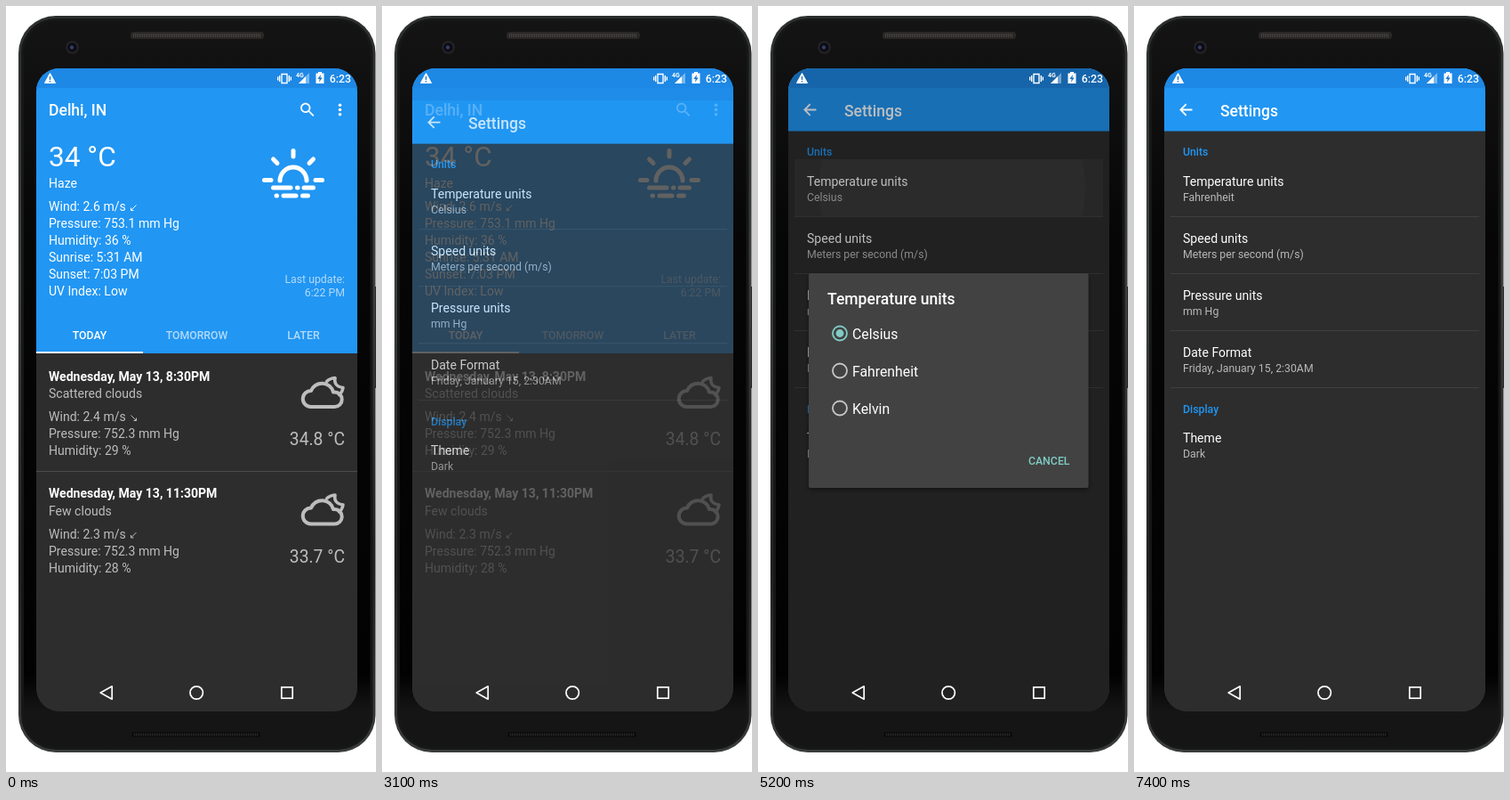
These frames come from a looping animation (416 by 860 pixels, 8000 ms). An HTML page:

```html
<!DOCTYPE html>
<html lang="en">
<head>
<meta charset="utf-8">
<title>Weather settings</title>
<style>
html, body { margin: 0; width: 100%; height: 100%; overflow: hidden; background: #fff; }
svg { display: block; width: 416px; height: 860px; font-family: Roboto, "Noto Sans", sans-serif; }
.m { font-weight: 500; }
.b { font-weight: 700; }
</style>
</head>
<body>
<svg id="stage" viewBox="0 0 416 860"></svg>
<script>
const W = '#fff', BLUE = '#2196f3', DARK = '#2d2d2d', TEAL = '#80cbc4', GREY = '#bdbdbd';
const SMALL = 12.3, BODY = 14.05, TITLE = 17.56;

const text = (s, x, y, size = BODY, fill = W, extra = '') =>
  `<text x="${x}" y="${y}" font-size="${size}" fill="${fill}" ${extra}>${s}</text>`;
const rect = (x, y, w, h, fill, extra = '') =>
  `<rect x="${x}" y="${y}" width="${w}" height="${h}" fill="${fill}" ${extra}/>`;
const line = (d, stroke, width, extra = '') =>
  `<path d="${d}" fill="none" stroke="${stroke}" stroke-width="${width}" ${extra}/>`;
const dot = (x, y, r, fill, extra = '') =>
  `<circle cx="${x}" cy="${y}" r="${r}" fill="${fill}" ${extra}/>`;
const MEDIUM = 'class="m"', END = 'text-anchor="end"', MID = 'text-anchor="middle" class="m"';
const ROUND = 'stroke-linecap="round" stroke-linejoin="round"';

// Small wind arrow pointing down, to the left (-1) or right (1)
const arrow = (y, dir, color) =>
  `<g transform="translate(143.5 ${y}) scale(${dir} 1)">` +
  line('M-3 -3L3 3M0 3H3V0', color, 1) + '</g>';

const phone = () =>
  rect(414, 315, 2, 114, '#222') +
  rect(14, 11, 401.5, 827, 'url(#rim)', 'rx="42"') +
  rect(17, 14, 395.5, 821, '#161717', 'rx="39"') +
  rect(20, 17, 389.5, 815, 'url(#face)', 'rx="36"') +
  rect(140, 29, 150, 8, '#2a2827', 'rx="3.5"') +
  line('M143 33H287', '#474341', 4, 'stroke-dasharray="1 1"') +
  dot(74.5, 46.5, 7.5, '#222226') + dot(74.5, 46.5, 5, '#0b0b12') + dot(74, 46.5, 2.2, '#333c66') +
  rect(141, 815, 145, 6, '#0c0c0c', 'rx="3"') +
  line('M144 818H283', '#2b2b2b', 3, 'stroke-dasharray="1 1"');

const statusIcons = () =>
  `<path d="M49.5 75.5L55.5 86.5H43.5Z" fill="#fff" stroke="#fff" stroke-linejoin="round"/>` +
  line('M49.5 79V83M49.5 84V85.5', '#1e78c8', 1.4) +
  line('M310 76.5H316V86.5H310ZM307.7 78V85M318.3 78V85M305.7 79.5V83.5M320.3 79.5V83.5', W, 1.4) +
  text('4G', 326, 80, 7, W, 'class="b"') +
  '<path d="M341 75V87H329Z" fill="#fff" opacity=".4"/><path d="M337 79V87H329Z" fill="#fff"/>' +
  '<path d="M351 74H355V75.5H357.5V87H348.5V75.5H351Z" fill="#fff"/>' +
  '<path d="M354 77L350.3 82H352.6L352 85.6L355.8 80.6H353.5Z" fill="#1e78c8"/>' +
  text('6:23', 388, 86, SMALL, W, END + ' ' + MEDIUM);

const navIcons = () =>
  line('M106.2 771L119.2 763.8V778.2Z', W, 1.7, 'stroke-linejoin="round"') +
  dot(214.2, 771, 7.2, 'none', 'stroke="#fff" stroke-width="1.7"') +
  rect(309.8, 764.8, 12.4, 12.4, 'none', 'stroke="#fff" stroke-width="1.7"');

const haze = () => line(
  'M308 196A15 15 0 0 1 338 196M290.5 195.5H298M348 195.5H355.5M300.5 172L305 176.5' +
  'M345.5 172L341 176.5M323 162.5V169M300.5 204H320M327.5 204H328M335 204H345.5' +
  'M304 213H304.5M312 213H326M333.5 213H339.5', W, 5, ROUND);

const cloud = () =>
  line('M342.5 450H369.5A8 8 0 0 0 369.5 433.6H368A13 12.5 0 0 0 343 432A9 9 0 0 0 342.5 450Z', GREY, 4, ROUND) +
  line('M360.5 421.5Q364 418 370 417.5Q368 427 379 428.5Q378 434 374.5 436.5', GREY, 3.5, ROUND);

const forecast = (dy, when, sky, wind, dir, humidity, temp) =>
  `<g transform="translate(0 ${dy})">` +
  text(when, 48, 420.5, BODY, W, 'class="b"') +
  text(sky, 48, 440, BODY, GREY) +
  [`Wind: ${wind} m/s`, 'Pressure: 752.3 mm Hg', `Humidity: ${humidity} %`]
    .map((s, i) => text(s, 48, 466 + 19 * i, BODY, GREY)).join('') +
  arrow(462.5, dir, GREY) + cloud() +
  text(temp + ' °C', 381, 493, 19.3, GREY, END) + '</g>';

const home = () =>
  rect(34, 70, 361, 722, DARK) + rect(34, 70, 361, 320, BLUE) + rect(34, 70, 361, 22, '#1e88e5') +
  text('Delhi, IN', 48, 123, TITLE, W, MEDIUM) +
  `<path transform="translate(328.4 106) scale(.878)" fill="#fff" d="M15.5 14h-.79l-.28-.27C15.41 12.59 16 11.11 16 9.5 16 5.91 13.09 3 9.5 3S3 5.91 3 9.5 5.91 16 9.5 16c1.61 0 3.09-.59 4.23-1.57l.27.28v.79l5 4.99L20.49 19l-4.99-5zm-6 0C7.01 14 5 11.99 5 9.5S7.01 5 9.5 5 14 7.01 14 9.5 11.99 14 9.5 14z"/>` +
  [111.2, 116.5, 121.8].map(y => dot(375.5, y, 1.8, W)).join('') +
  text('34 °C', 48, 180, 31.6) + text('Haze', 48, 204) + haze() +
  ['Wind: 2.6 m/s', 'Pressure: 753.1 mm Hg', 'Humidity: 36 %', 'Sunrise: 5:31 AM', 'Sunset: 7:03 PM', 'UV Index: Low']
    .map((s, i) => text(s, 48, 230 + 19 * i)).join('') +
  arrow(226.5, -1, W) +
  text('Last update:', 381, 311, SMALL, '#b3dafb', END) +
  text('6:22 PM', 381, 326, SMALL, '#b3dafb', END) +
  text('TODAY', 94, 374, SMALL, W, MID) +
  text('TOMORROW', 214.5, 374, SMALL, '#b3dafb', MID) +
  text('LATER', 334.5, 374, SMALL, '#b3dafb', MID) +
  rect(34, 388, 120, 2, W) +
  forecast(0, 'Wednesday, May 13, 8:30PM', 'Scattered clouds', 2.4, 1, 29, '34.8') +
  rect(34, 522, 361, 1, '#4c4c4c') +
  forecast(131.5, 'Wednesday, May 13, 11:30PM', 'Few clouds', 2.3, -1, 28, '33.7');

const menu = () =>
  rect(219, 95.5, 172, 168.5, '#f7f7f7', 'rx="2" filter="url(#shadow)"') +
  rect(219, 180.5, 172, 42, '#000', 'id="pressed" opacity=".08"') +
  ['Graphs', 'Detect Location', 'Settings', 'About']
    .map((s, i) => text(s, 233, 122 + 42 * i, BODY, '#212121')).join('');

const pref = (y, name, value, id = '') =>
  text(name, 55, y) + text(value, 55, y + 17, SMALL, '#b9b9b9', id);

const settings = () =>
  rect(34, 70, 361, 722, DARK) + rect(34, 70, 361, 70.5, BLUE) + rect(34, 70, 361, 22, '#1e88e5') +
  line('M65.5 116.5H52.5M58.7 110.2L52.4 116.5L58.7 122.8', W, 1.8) +
  text('Settings', 97, 124, TITLE, W, MEDIUM) +
  '<g id="ripple" clip-path="url(#row)">' + rect(41, 172, 347, 64, '#fffff0', 'opacity=".06"') +
  dot(218, 204, 94, W, 'id="wave" opacity=".05"') + '</g>' +
  text('Units', 55, 168, SMALL, BLUE, MEDIUM) +
  pref(202, 'Temperature units', 'Celsius', 'id="unit"') +
  pref(266, 'Speed units', 'Meters per second (m/s)') +
  pref(330, 'Pressure units', 'mm Hg') +
  pref(394, 'Date Format', 'Friday, January 15, 2:30AM') +
  [236, 300, 364, 428].map(y => rect(41, y, 347, 1, '#3f3f3f')).join('') +
  text('Display', 55, 457, SMALL, BLUE, MEDIUM) +
  pref(490, 'Theme', 'Dark');

const dialog = () =>
  rect(57, 300, 314.5, 241, '#424242', 'rx="2" filter="url(#shadow)"') +
  text('Temperature units', 78, 335, TITLE, W, MEDIUM) +
  ['Celsius', 'Fahrenheit', 'Kelvin'].map((s, i) => {
    const y = 367.5 + 42 * i;
    return dot(92, y, 8, 'none', 'class="ring" stroke-width="1.8"') +
      dot(92, y, 4.4, TEAL, 'class="fill"') + text(s, 106, y + 6.5, 15.8);
  }).join('') +
  text('CANCEL', 350.5, 515, SMALL, TEAL, END + ' ' + MEDIUM);

const stage = document.getElementById('stage');
stage.innerHTML = `<defs>
  <linearGradient id="rim" x2="0" y2="1"><stop stop-color="#2c2f2e"/><stop offset=".35" stop-color="#3d403f"/><stop offset=".75" stop-color="#222"/><stop offset="1" stop-color="#3a3c3b"/></linearGradient>
  <linearGradient id="face" x2="0" y2="1"><stop stop-color="#141414"/><stop offset=".3" stop-color="#060606"/><stop offset=".9" stop-color="#020202"/><stop offset=".95" stop-color="#151515"/></linearGradient>
  <clipPath id="screen"><rect x="34" y="70" width="361" height="722" rx="26"/></clipPath>
  <clipPath id="row"><rect x="41" y="172" width="347" height="64"/></clipPath>
  <clipPath id="reveal"><rect id="revealBox"/></clipPath>
  <filter id="shadow" x="-10%" y="-10%" width="120%" height="125%"><feDropShadow dx="0" dy="2.5" stdDeviation="2.5" flood-opacity=".4"/></filter>
</defs>` + phone() +
  `<g clip-path="url(#screen)"><g id="home">${home()}</g>
  <g id="menu" clip-path="url(#reveal)">${menu()}</g>
  <g id="settings">${settings()}</g>
  ${rect(34, 70, 361, 722, '#000', 'id="dim"')}
  <g id="dialog">${dialog()}</g>${statusIcons()}${navIcons()}</g>`;

const el = id => document.getElementById(id);
const set = (node, attrs) => { for (const k in attrs) node.setAttribute(k, attrs[k]); };
const show = (id, opacity) => set(el(id), { opacity, display: opacity > 0 ? 'inline' : 'none' });
const clamp = v => Math.min(1, Math.max(0, v));
const easeOut = v => 1 - (1 - clamp(v)) ** 3;
const rings = stage.querySelectorAll('.ring'), fills = stage.querySelectorAll('.fill');

function draw(ms) {
  const t = Math.floor(ms / 100) * 100;

  // Overflow menu unfolds from its button, then fades
  const open = easeOut((t - 260) / 300);
  show('menu', t < 300 || t >= 2700 ? 0 : t >= 2600 ? .72 : clamp((t - 230) / 170));
  show('pressed', t >= 2600 ? .08 : 0);
  set(el('revealBox'), {
    x: 375 - 164 * open, y: 100 - 10 * open, width: 188 * open, height: 190 * open
  });

  // Settings screen slides up while fading in
  const slide = 58 * (1 - easeOut((t - 2950) / 400));
  show('settings', t < 3000 ? 0 : clamp((t - 2950) / 200));
  set(el('settings'), { transform: `translate(0 ${slide})` });

  // Touch ripple, dialog and backdrop
  show('ripple', t < 5100 || t >= 5300 ? 0 : t < 5200 ? 1 : .6);
  set(el('wave'), { r: t < 5200 ? 94 : 150 });
  const rise = clamp((t - 5000) / 200);
  const fall = t < 7200 ? 0 : clamp((t - 7130) / 160);
  show('dialog', rise * (1 - fall));
  const dimIn = clamp((t - 5000) / 300) ** 2;
  const dimOut = t < 7200 ? 0 : clamp((t - 7130) / 220);
  show('dim', .58 * dimIn * (1 - dimOut));

  const picked = t >= 7200 ? 1 : 0;
  el('unit').textContent = picked ? 'Fahrenheit' : 'Celsius';
  rings.forEach((r, i) => set(r, { stroke: i === picked ? TEAL : '#c6c6c6' }));
  fills.forEach((f, i) => set(f, { opacity: i === picked ? 1 : 0 }));
}

const start = performance.now();
function loop() {
  draw((performance.now() - start) % 8000);
  requestAnimationFrame(loop);
}
loop();
</script>
</body>
</html>
```
